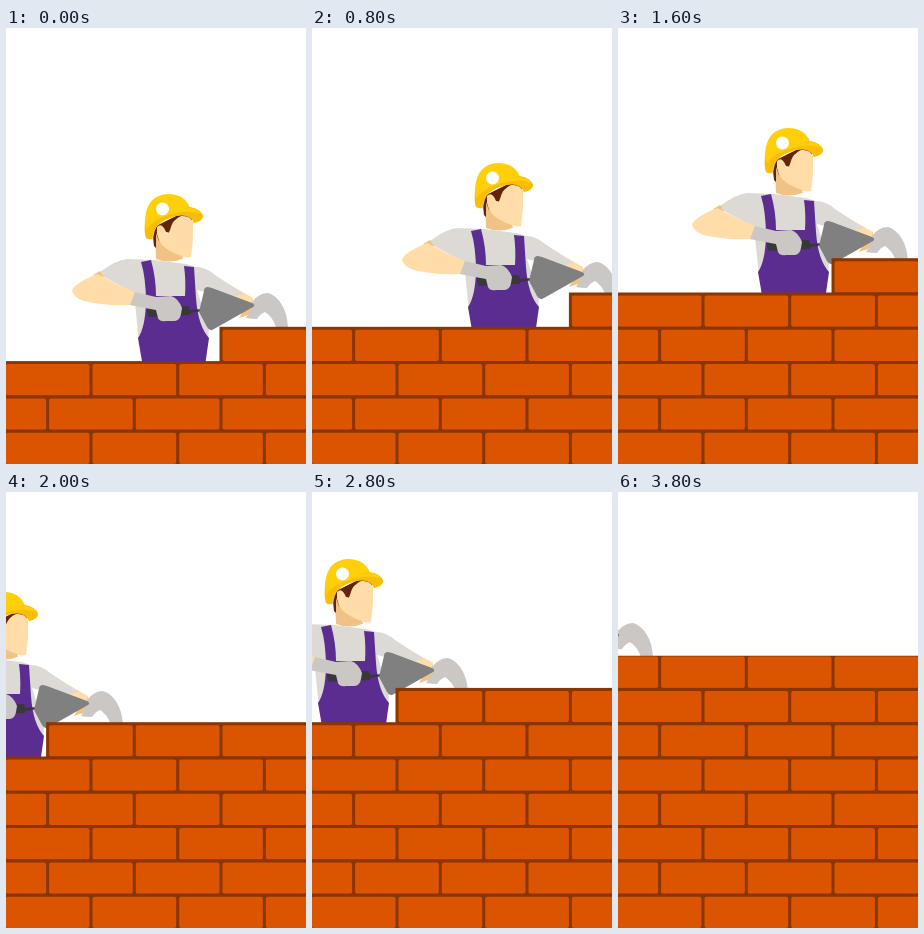
Animation of 300 by 436 pixels, one loop 4000 ms. Source, as an HTML page with a canvas:

```html
<!DOCTYPE html>
<html lang="en">
<head>
<meta charset="utf-8">
<title>Bricklayer</title>
<style>
html, body { margin: 0; width: 100%; height: 100%; overflow: hidden; background: #fff; }
canvas { display: block; }
</style>
</head>
<body>
<canvas id="stage" width="300" height="436"></canvas>
<script>
const ctx = document.getElementById('stage').getContext('2d');

const STEP = 200, LOOP = 4000;
const BRICK_W = 86.7, ROW_H = 34.3, JOINT = 3;
const BOTTOM = 403.2;      // centre of the lowest horizontal joint
const WALL_TOP = 163.8;
const FIRST_ROW = 3;       // rows already standing when the loop starts

// Worker position: one list per course, one x per step
const workerX = [
  [0, -87, -175, -258],
  [24, -34, -121, -209],
  [8, -78, -165, -252],
  [18, -33, -126, -213],
  [-2, -80, -170, -247]
];
const workerY = [[0, 3, 3, 3], [-31, -32, -32, -32], [-66, -66, -66, -66],
  [-99, -99, -99, -99], [-134, -134, -134, -134]];

const SKIN = '#ffdca8', SHADE = '#f0c283', SHIRT = '#dddad6', GLOVE = '#cbc7c4',
  PURPLE = '#5c2d91', HAIR = '#642506', HAT = '#ffd00a', BRIM = '#f9bd08',
  STEEL = '#808080', DARK = '#38373a';

// Shapes from back to front
const worker = [
  // far arm and glove
  [SHADE, 'M217 256L247 271L248 285L233 290L236 285Z'],
  [SKIN, 'M205 246L247 270L246 278L222 268Z'],
  [GLOVE, 'M240 290Q246 282 246 274Q253 265 262 265Q270 267 276 277Q281 285 282 299H270Q266 288 259 284Q254 286 251 291Q245 291 240 290Z'],
  // shirt
  [SHIRT, 'M94 244Q110 232 121 231L148 232L180 236L190 239Q200 239 209 247L238 266L222 270L191 262L203 300L202 315H133L128 265L98 249Z'],
  // overalls
  [PURPLE, 'M135 234L145 232Q150 250 150 268H179Q180 252 178 238L188 239Q189 255 190 270Q192 298 203 310L198 345H138L132 310Q139 300 140 275Q140 250 135 234Z'],
  // near arm
  [SHADE, 'M87 247L94 243L98 249L92 252Z'],
  [SKIN, 'M91 246Q67 256 66 263Q68 270 78 273Q96 278 125 277L129 264Q113 258 97 249Z'],
  // neck, face, hair
  [SHADE, 'M149 207L150 231Q164 236 176 231L177 208Z'],
  [HAIR, 'M146 200L148 218L151 221L156 203L164 205L169 192L189 192Q184 185 174 186Z'],
  [SKIN, 'M151 199Q156 194 160 204Q162 208 164 202Q166 192 175 188Q184 187 187 194V211L185 229Q177 231 166 224Q153 218 151 206Z'],
  [SHADE, 'M150 205L154 216Q164 225 176 228L177 231L150 231Z'],
  [GLOVE, 'M143 201Q148 195 152 196Q148 202 147 212Q142 208 143 201Z'],
  // helmet
  [HAT, 'M140 210Q138 204 139 191Q141 167 162 166Q179 166 184 180Q195 181 197 188Q197 193 188 195Q184 185 170 188Q148 193 143 210Z'],
  [BRIM, 'M140 210Q138 204 139 197Q157 185 184 179Q195 181 197 188Q197 193 188 195Q184 185 170 188Q148 193 146 211Q143 212 140 210Z'],
  [HAT, 'M140 197Q158 183 184 180Q193 181 196 186Q183 181 166 186Q148 191 140 201Z'],
  ['#fff', 'M150 181a6.5 6.5 0 1 0 13 0a6.5 6.5 0 1 0 -13 0Z'],
  // trowel
  [DARK, 'M141 279L183 278Q185 283 184 287L143 289Q140 284 141 279Z'],
  [DARK, 'M183 282L197 281V283L184 285Z'],
  [STEEL, 'M202 259Q198 259 198 263L193 284L201 299Q204 304 208 301L247 279Q250 277 246 275L206 260Z'],
  // near glove
  [GLOVE, 'M129 264L124 277L139 280L150 282L152 290Q154 294 160 293L169 293Q174 292 175 286L176 280Q172 270 165 268L150 269Z']
].map(([color, d]) => [color, new Path2D(d)]);

function drawWorker(x, y) {
  ctx.save();
  ctx.translate(x, y);
  for (const [color, path] of worker) {
    ctx.fillStyle = color;
    ctx.fill(path);
  }
  ctx.restore();
}

// Draws one course from its brick joint at `left` to the right edge
function drawRow(row, left) {
  const y = BOTTOM - row * ROW_H;
  const start = Math.max(0, left - JOINT / 2);
  ctx.fillStyle = '#8b3500';
  ctx.fillRect(start, y - JOINT / 2, 300 - start, ROW_H + JOINT);
  ctx.fillStyle = '#db5400';
  ctx.beginPath();
  for (let x = left; x < 300; x += BRICK_W) {
    ctx.roundRect(x + JOINT / 2, y + JOINT / 2, BRICK_W - JOINT, ROW_H - JOINT, 2);
  }
  ctx.fill();
}

function draw(now) {
  const tick = Math.floor(now % LOOP / STEP);
  const course = Math.floor(tick / 4), step = tick % 4;
  const top = FIRST_ROW + course;
  const lastJoint = row => row % 2 ? 215 : 258.4;

  ctx.clearRect(0, 0, 300, 436);
  drawWorker(workerX[course][step], workerY[course][step]);

  ctx.save();
  ctx.beginPath();
  ctx.rect(0, WALL_TOP, 300, 436);
  ctx.clip();
  drawRow(top, lastJoint(top) - step * BRICK_W);
  for (let row = top - 1; row >= 0; row--) drawRow(row, lastJoint(row) - 3 * BRICK_W);
  ctx.restore();
}

const began = performance.now();
function loop() {
  draw(performance.now() - began);
  requestAnimationFrame(loop);
}
loop();
</script>
</body>
</html>
```
